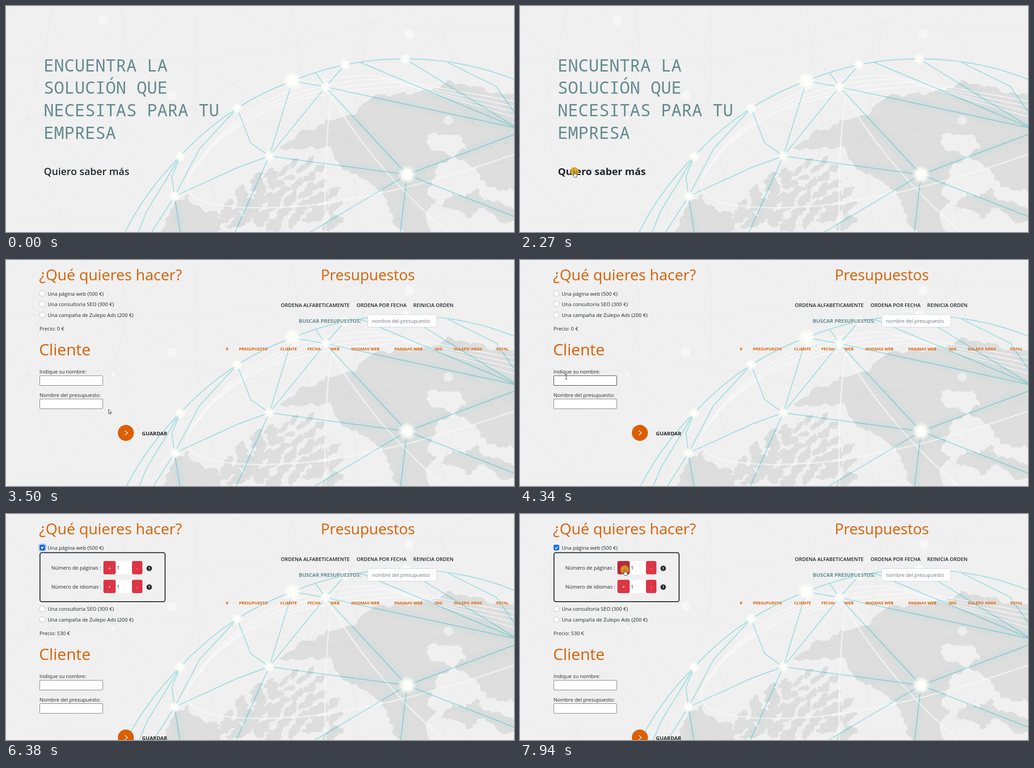
Recreate the animation shown at these times as an HTML page. Size 1121 by 500 pixels, loop 8000 ms.

```html
<!DOCTYPE html>
<html lang="es">
<head>
<meta charset="utf-8">
<style>
html, body { margin: 0; width: 100%; height: 100%; overflow: hidden; background: #f0f0f0; }
svg { display: block; width: 1121px; height: 500px; font-family: "Open Sans", "Noto Sans", sans-serif; }
.tint { mix-blend-mode: multiply; }
</style>
</head>
<body>
<svg id="stage" viewBox="0 0 1121 500"></svg>
<script>
const ORANGE = '#db5f02', INK = '#212529', TEAL = '#648b90', RED = '#dc3545';
const LOOP = 8000, STEP = 74, SHIFT = 112;

let seed = 11;
const rnd = () => (seed = seed * 16807 % 2147483647) / 2147483647;
const range = (n, f) => Array.from({ length: n }, (_, i) => f(i));

// ---------- drawing helpers ----------
const text = (x, y, size, str, weight = 400, fill = INK, extra = '') =>
  `<text x="${x}" y="${y}" font-size="${size}" font-weight="${weight}" fill="${fill}" ${extra}>${str}</text>`;
const rect = (x, y, w, h, fill, r = 0, stroke = 'none', extra = '') =>
  `<rect x="${x}" y="${y}" width="${w}" height="${h}" rx="${r}" fill="${fill}" stroke="${stroke}" ${extra}/>`;
const circle = (x, y, r, fill, extra = '') => `<circle cx="${x}" cy="${y}" r="${r}" fill="${fill}" ${extra}/>`;
const path = (d, stroke, width, extra = '') =>
  `<path d="${d}" fill="none" stroke="${stroke}" stroke-width="${width}" ${extra}/>`;

// ---------- land ----------
// Roughens a polygon into a coastline
function coast(pts) {
  for (let i = 0; i < 3; i++) {
    pts = pts.flatMap((p, n) => {
      const q = pts[(n + 1) % pts.length], dx = q[0] - p[0], dy = q[1] - p[1];
      const k = (rnd() - .5) * Math.min(.6, 14 / (Math.hypot(dx, dy) + 1));
      return [p, [(p[0] + q[0]) / 2 - dy * k, (p[1] + q[1]) / 2 + dx * k]];
    });
  }
  return 'M' + pts.map(p => p.map(v => v.toFixed(1))).join('L') + 'Z';
}
function island(x, y, rx, ry) {
  const tilt = -.3 - rnd() * .7, cos = Math.cos(tilt), sin = Math.sin(tilt);
  return coast(range(9, i => {
    const a = i * Math.PI * 2 / 9, k = .7 + rnd() * .6;
    const u = Math.cos(a) * rx * k, v = Math.sin(a) * ry * k;
    return [x + u * cos - v * sin, y + u * sin + v * cos];
  }));
}
const shores = [
  '603,314 690,262 764,241 792,214 880,190 945,181 985,167 1040,178 1130,202 1130,408 1062,401 1040,368 990,330 1015,318 1000,284 930,286 934,311 985,333 955,350 930,412 950,428 926,465 938,510 882,510 855,470 830,408 762,372 715,310',
  '332,510 372,432 404,415 413,440 455,480 466,510',
  '957,443 985,412 1010,424 1040,401 1055,430 1130,450 1130,482 1042,447 1015,470'
].map(s => coast(s.split(' ').map(p => p.split(',').map(Number))));

// Islands spread wider and grow towards the bottom
const ISLES = 40;
const isles = range(ISLES, i => {
  const v = i / ISLES, across = i * .618 % 1, size = 9 + v * 17 + rnd() * 7;
  return island(620 - v * 25 + (across - .5) * (130 + v * 220), 350 + v * 140 - (across - .5) * 50 * (1 - v), size, size * .48);
});
const land = [...shores, ...isles].join('');

// ---------- network ----------
const nodes = {
  a: [632, 166], b: [885, 373], c: [510, 226], d: [384, 333], e: [372, 421], f: [581, 332], g: [705, 179], h: [748, 130], i: [881, 117],
  j: [427, 316], k: [540, 303], l: [512, 357], m: [366, 378], n: [1082, 178], o: [975, 125], q: [780, 124], r: [683, 147], s: [310, 455],
  A: [288, 510], B: [318, 506], C: [386, 510], D: [501, 510], E: [655, 510], F: [869, 510],
  R: [1130, 271], S: [1130, 247], T: [1130, 281], U: [1130, 469]
};
const chain = s => 'M' + [...s].map(c => nodes[c]).join('L');
const rim = 'M258 510' + [...'dcahi', null].map(c => `A640 640 0 0 1 ${c ? nodes[c] : '1130 166'}`).join('');
const links = rim + 'agh rg gfbgR ejckfle emd af Asd BeC fD EbF TbU qR iR onS'.split(' ').map(chain).join('');
const stars = [...'abcdefghi'].map((c, i) => circle(...nodes[c], i < 2 ? 21 : 13, 'url(#glow)')).join('');

// Faint triangles over a jittered grid
const CELL = 175;
const grid = range(5, y => range(9, x => [(x - .8 + rnd() * .7) * CELL, (y - .8 + rnd() * .7) * CELL]));
const net = range(4, y => range(8, x =>
  `M${grid[y][x]}L${grid[y][x + 1]}L${grid[y + 1][x]}ZL${grid[y + 1][x + 1]}`).join('')).join('');

const arcs = range(4, i => `M${408 + i * 8} ${372 - i * 12}C${485 + i * 18} ${235 - i * 6} ${640 + i * 15} ${156 + i * 10} ${800 + i * 30} ${153 + i * 8}T1130 ${212 + i * 12}`).join('');
const rings = 'M718 198Q699 340 706 510M718 198Q810 360 985 510M440 335C400 365 388 398 412 420C460 455 620 449 700 437Q900 408 1130 325';
const bubbles = [[215, 32], [366, 198], [976, 253], [890, 62]];

const background = `<g id="back">
  <path d="${land}" fill="#dedede"/>
  ${path(net, '#f6f7f7', 1, 'class="tint"')}
  ${path(arcs, '#fafafa', 1.6)}
  ${path(rings, '#fafafa', 3, 'opacity=".7"')}
  <g clip-path="url(#land)">${path(links, '#7fd3d6', 13, 'opacity=".1" filter="url(#blur)"')}</g>
  ${path(links, '#a5eaee', 1.9, 'class="tint"')}
  ${bubbles.map(p => circle(...p, 10.5, '#fff', 'opacity=".45"')).join('')}
  ${circle(237, 247, 4, '#fff', 'opacity=".6"')}
  ${stars}
</g>`;

// ---------- first screen ----------
const title = ['ENCUENTRA LA', 'SOLUCIÓN QUE', 'NECESITAS PARA TU', 'EMPRESA'];
const home = `<g id="home">
  <g font-family="'Noto Sans Mono', 'DejaVu Sans Mono', monospace">
    ${title.map((s, i) => text(83, 144.5 + i * 49.7, 38, s, 450, TEAL)).join('')}</g>
  ${text(83.5, 374, 22.1, 'Quiero saber más', 600, INK, 'id="more"')}
</g>`;

// ---------- second screen ----------
const check = y => rect(74.5, y, 11.5, 11.5, '#fff', 3, '#bfbfbf');
const option = (y, label) => check(y) + text(92, y + 10, 11.3, label);
const field = (y, label, id) => text(74, y - 5, 11.3, label) +
  rect(74.5, y, 139, 21.5, '#fff', 1.5, '#767676', `id="${id}"`);
const button = (x, y, w, sign, id) => rect(x, y, w, 29.5, RED, 4, 'none', `id="${id}"`) +
  text(x + w / 2, y + 19.5, 11.3, sign, 400, '#fff', 'text-anchor="middle"');
const counter = (y, label, id) => text(100, y + 19, 11.3, label) +
  rect(240, y, 40, 29.5, '#fff') + text(244.5, y + 19, 11.3, '1') +
  button(215, y, 27, '+', id + 'More') + button(278, y, 23, '-', id + 'Less') +
  circle(316, y + 16.3, 6, INK) + text(316, y + 19.8, 9, '?', 700, '#fff', 'text-anchor="middle"');
const columns = { '#': 485, PRESUPUESTO: 514, CLIENTE: 605, FECHA: 665, WEB: 716, 'IDIOMAS WEB': 762,
  'PAGINAS WEB': 857, SEO: 946, 'ZULEPO ADDS': 988, TOTAL: 1081 };

const form = `<g id="form">
  ${text(73, 45, 33.5, '¿Qué quieres hacer?', 400, ORANGE)}
  <g id="ring">${rect(71, 65, 18, 18, '#b9d4fb', 5)}</g>
  ${option(68.5, 'Una página web (500 €)')}
  <g id="ticked">${rect(74, 68, 12.5, 12.5, '#0d6efd', 3)}${path('M77 74.5L79.3 76.8L83.5 72', '#fff', 1.6)}</g>
  <g id="options">
    ${rect(75, 85.5, 276, 108.5, 'none', 4, INK, 'stroke-width="2"')}
    ${counter(104, 'Número de páginas :', 'pages')}${counter(145.5, 'Número de idiomas :', 'langs')}
  </g>
  <g id="rest">
    ${option(92, 'Una consultoria SEO (300 €)')}
    ${option(115.7, 'Una campaña de Zulepo Ads (200 €)')}
    ${text(74, 155.5, 11.3, '', 400, INK, 'id="price"')}
    ${text(73, 211, 35.3, 'Cliente', 400, ORANGE)}
    ${field(256, 'Indique su nombre:', 'name')}
    ${field(307.5, 'Nombre del presupuesto:', 'budget')}
    ${circle(264.5, 382.5, 17.7, ORANGE)}${path('M262.5 377.5L268 382.5L262.5 387.5', '#fff', 1.4)}
    ${text(300, 387.5, 11.4, 'GUARDAR', 700)}
  </g>
  ${text(694.5, 45, 32.8, 'Presupuestos', 400, ORANGE)}
  ${text(606.5, 104, 11.2, 'ORDENA ALFABETICAMENTE', 600)}
  ${text(773.5, 104, 11.2, 'ORDENA POR FECHA', 600)}
  ${text(898.5, 104, 11.2, 'REINICIA ORDEN', 600)}
  ${text(646, 138.5, 11.4, 'BUSCAR PRESUPUESTOS:', 700, TEAL)}
  ${rect(798, 120.5, 152.5, 28, '#fff', 4, '#ced4da')}
  ${text(807.5, 138.5, 11.1, 'nombre del presupuesto', 400, '#6c757d')}
  ${Object.entries(columns).map(([s, x]) => text(x, 200, 9.1, s, 700, ORANGE)).join('')}
</g>`;

const pointer = `${circle(0, 0, 9.5, '#dda018', 'id="click" opacity=".85"')}
<g id="cursor" stroke="#222" stroke-width=".9" stroke-linejoin="round">
  <path id="arrow" fill="#fff" d="M0 0V9.2L2.1 7.3L3.7 10.8L5.2 10.1L3.7 6.8H6.6Z"/>
  <path id="hand" fill="#fff" d="M-1 .8Q0-.6 1 .8V5L5 6Q6.2 6.6 5.8 8.5L5 13H-.5L-3.5 8.6Q-3.6 7-2.4 7.4L-1 8.6Z"/>
  <path id="beam" fill="none" d="M-2-5.5H2M0-5.5V4.5M-2 4.5H2"/>
</g>`;

document.getElementById('stage').innerHTML = `<defs>
  <radialGradient id="glow">
    <stop offset="0" stop-color="#fffffb"/><stop offset=".5" stop-color="#fdfdf9" stop-opacity=".95"/>
    <stop offset="1" stop-color="#fdfdf9" stop-opacity="0"/>
  </radialGradient>
  <filter id="blur" x="-10%" y="-10%" width="120%" height="120%"><feGaussianBlur stdDeviation="6"/></filter>
  <clipPath id="land"><path d="${land}"/></clipPath>
</defs>${rect(0, 0, 1121, 500, '#f0f0f0')}` + background + home + form + pointer;

// ---------- motion ----------
// Each move: start, end, route; the cursor advances in even steps
const moves = [
  [370, 1060, 'M1078 478C700 500 350 440 123 434'],
  [1190, 1530, 'M123 434C60 436-20 405 81 380'],
  [1600, 1810, 'M81 380Q100 370 120 366'],
  [2990, 3780, 'M121 366C130 418 230 414 239 366C240 330 180 270 150 286'],
  [3850, 4340, 'M150 286Q120 258 102 259'],
  [4670, 5430, 'M102 259Q110 150 78 71'],
  [5500, 5780, 'M78 71L77 70'],
  [6710, 7470, 'M77 70C180 80 320 130 237 122'],
  [7540, 7680, 'M237 122L231 123']
].map(([start, end, d]) => {
  const route = document.createElementNS('http://www.w3.org/2000/svg', 'path');
  route.setAttribute('d', d);
  return { start, end, route, steps: Math.round((end - start) / STEP) };
});

function cursorAt(t) {
  const m = moves.filter(m => t >= m.start).pop();
  if (!m) return null;
  const k = Math.min(m.steps, Math.floor((t - m.start) / (m.end - m.start) * m.steps + .02));
  return m.route.getPointAtLength(m.route.getTotalLength() * (k + 1) / (m.steps + 1));
}

const $ = id => document.getElementById(id);
const show = (id, on) => $(id).setAttribute('display', on ? 'inline' : 'none');
const within = (t, a, b) => t >= a && t < b;

function draw(t) {
  const second = t >= 2460, open = t >= 6310, p = cursorAt(t);
  const overLink = within(t, 1670, 2460), overPlus = t >= 7540;
  const overField = within(t, 2460, 5430) && p.y > 256 && p.y < 278 && p.x < 214;

  $('back').setAttribute('transform', `translate(0 ${second ? 6 : 0})`);
  show('home', !second);
  show('form', second);
  $('more').setAttribute('font-weight', overLink ? 700 : 600);

  show('ticked', open);
  show('options', open);
  show('ring', within(t, 6310, 7940));
  $('rest').setAttribute('transform', `translate(0 ${open ? SHIFT : 0})`);
  $('price').textContent = `Precio: ${open ? 530 : 0} €`;
  $('name').setAttribute('stroke', overField ? '#333' : '#767676');
  $('pagesMore').setAttribute('fill', overPlus ? '#b52b3a' : RED);

  show('cursor', p);
  show('click', within(t, 2270, 2460) || within(t, 6180, 6380) || t >= 7940);
  if (!p) return;
  for (const id of ['cursor', 'click']) $(id).setAttribute('transform', `translate(${p.x} ${p.y})`);
  show('hand', overLink || overPlus);
  show('beam', overField);
  show('arrow', !overLink && !overPlus && !overField);
}

function tick() {
  draw(performance.now() % LOOP);
  requestAnimationFrame(tick);
}
tick();
</script>
</body>
</html>
```
